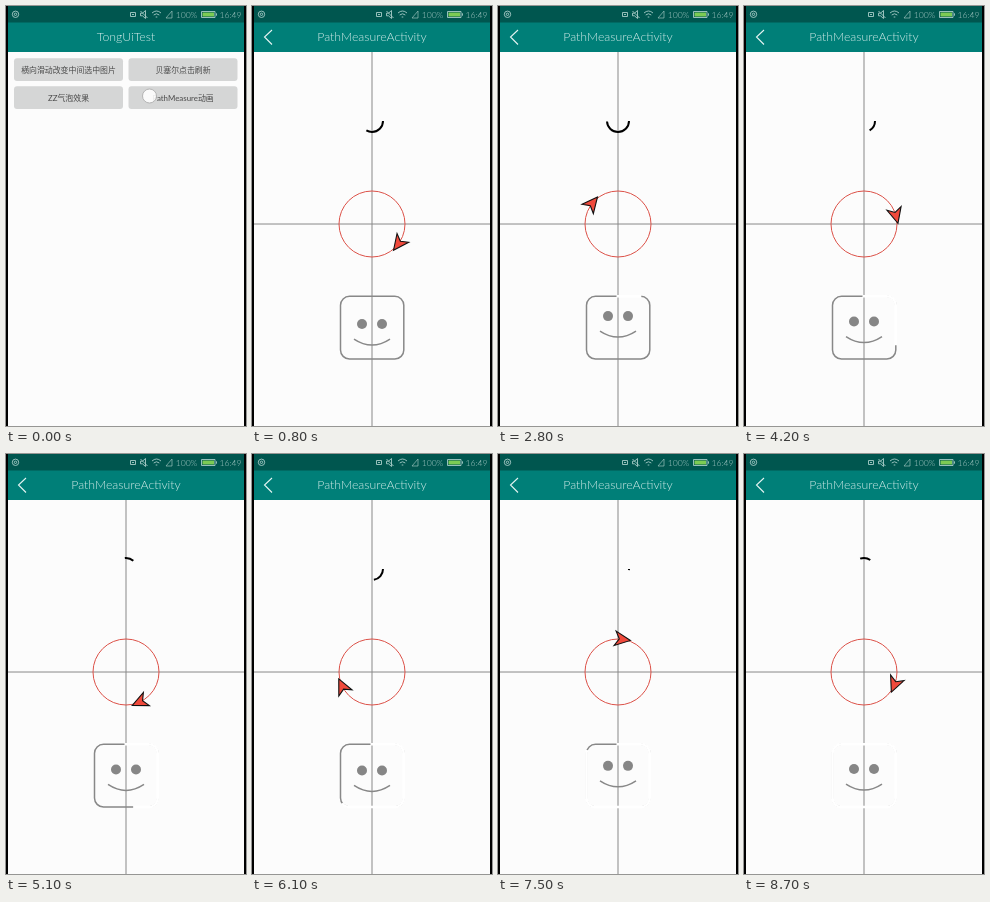
An HTML page that plays this animation: 240 by 420 pixels, repeating every 8.8 s.

```html
<!DOCTYPE html>
<html lang="zh">
<head>
<meta charset="utf-8">
<title>PathMeasure</title>
<style>
  html, body { margin: 0; width: 100%; height: 100%; overflow: hidden; background: #000; }
  svg { display: block; width: 100%; height: 100%; }
  text { font-family: Lato, "Noto Sans CJK SC", "Noto Sans CJK", sans-serif; font-weight: 300; text-anchor: middle; }
  .title { font-size: 12.3px; fill: #d3ece9; }
  .status { font-size: 8.6px; fill: #a9ccc8; }
  .label { font-size: 7.9px; font-weight: 400; fill: #4a4a4a; }
  .line { fill: none; stroke: #888; }
</style>
</head>
<body>
<svg viewBox="0 0 240 420">
  <rect width="240" height="420" fill="#000"/>
  <rect x="2" width="236" height="420" fill="#fcfcfc"/>
  <rect x="2" y="16" width="236" height="30" fill="#007f78"/>

  <g id="activity">
    <path d="M20 24L12.5 31L20 38.5" fill="none" stroke="#e4f4f2" stroke-width="1.1"/>
    <text class="title" x="120" y="35">PathMeasureActivity</text>
    <path class="line" d="M2 218H238M120 46V420"/>
    <path id="spinner" d="M131 115a11 11 0 0 1-22 0a11 11 0 0 1 22 0" pathLength="1" fill="none" stroke="#000" stroke-width="2"/>
    <circle cx="120" cy="218" r="33" fill="none" stroke="#dc5148"/>
    <path id="arrow" d="M8 0L-7.5-7.3L-3.3 0L-7.5 7.3Z" fill="#f04a3c" stroke="#111" stroke-width="1.1"/>
    <rect class="line" x="88.5" y="290.3" width="63.3" height="62.7" rx="9" stroke-width="1.5"/>
    <path id="eraser" d="M118.5 290.3H142.8a9 9 0 0 1 9 9V344a9 9 0 0 1-9 9H97.5a9 9 0 0 1-9-9V299.3a9 9 0 0 1 9-9Z" pathLength="1" fill="none" stroke="#fff" stroke-width="2.6"/>
    <g id="face">
      <circle cx="110" r="5" fill="#868686"/>
      <circle cx="130" r="5" fill="#868686"/>
      <path class="line" d="M102 15Q120 27 138 15" stroke-width="1.5"/>
    </g>
  </g>

  <g id="menu">
    <rect x="2" y="46" width="236" height="374" fill="#fcfcfc"/>
    <rect x="2" y="16" width="236" height="30" fill="#007f78"/>
    <text class="title" x="120" y="35">TongUiTest</text>
    <g id="buttons"></g>
    <circle cx="143.5" cy="90" r="7" fill="#fff" fill-opacity=".88" stroke="#b4b4b4"/>
  </g>

  <rect x="2" width="236" height="16.5" fill="#00564f"/>
  <g fill="none" stroke="#a9ccc8" stroke-width=".9">
    <circle cx="9.5" cy="8.3" r="3.2"/>
    <circle cx="9.5" cy="8.3" r="1.2"/>
    <path d="M124.5 6.5h5v4h-5zM126 8.5h2"/>
    <path d="M134.5 7.2h2l3-2.7v8l-3-2.7h-2zM134.5 5l7 7"/>
    <path d="M146 7q4.500-4 9 0M147.700 9q2.800-2.500 5.600 0M149.700 11h1.600"/>
    <path d="M160 12l6-7v7z" stroke-opacity=".7"/>
    <path d="M195.500 5.500h13.500v6h-13.500zM210.500 7.300v2.400"/>
  </g>
  <rect x="196.500" y="6.500" width="11.500" height="4" fill="#7ccb54"/>
  <text class="status" x="180.500" y="11.500">100%</text>
  <text class="status" x="224.500" y="11.500">16:49</text>
</svg>
<script>
  const LOOP = 8800;
  const SPIN = 1816;
  const $ = id => document.getElementById(id);
  const [spinner, arrow, eraser, face, menu] =
    ['spinner', 'arrow', 'eraser', 'face', 'menu'].map($);
  const clamp = x => Math.min(1, Math.max(0, x));
  const cycle = x => x - Math.floor(x);

  const labels = ['横向滑动改变中间选中图片', '贝塞尔点击刷新', 'ZZ气泡效果', 'PathMeasure动画'];
  $('buttons').innerHTML = labels.map((label, i) => {
    const x = 8 + (i % 2) * 114.5, y = 52.3 + (i >> 1) * 28;
    return `<rect x="${x}" y="${y}" width="109" height="22.800" rx="3" fill="#d5d6d6"/>
      <text class="label" x="${x + 54.5}" y="${y + 14.3}">${label}</text>`;
  }).join('');

  // Show only the part of a unit-length path between two fractions.
  function showPart(path, from, to) {
    path.style.strokeDasharray = `${to - from} 2`;
    path.style.strokeDashoffset = -from;
    path.style.visibility = to > from ? 'visible' : 'hidden';
  }

  function draw(t) {
    menu.style.opacity = 1 - clamp((t - 150) / 200);

    const v = (1 - Math.cos(Math.PI * cycle((t - 85) / SPIN))) / 2;
    showPart(spinner, v - (0.5 - Math.abs(v - 0.5)), v);

    const s = t - 800;
    const angle = Math.max(0, 37 + 0.0917 * s - 3e-7 * s * s);
    arrow.setAttribute('transform',
      `translate(120 218) rotate(${angle}) translate(33 0) rotate(90)`);

    showPart(eraser, 0, clamp((t - 2150) / 6180));

    const drop = cycle((t - 40) / (SPIN / 2));
    face.setAttribute('transform', `translate(0 ${309.7 + 10 * drop})`);
  }

  let start;
  function tick(now) {
    start ??= now;
    draw((now - start) % LOOP);
    requestAnimationFrame(tick);
  }
  draw(0);
  requestAnimationFrame(tick);
</script>
</body>
</html>
```
